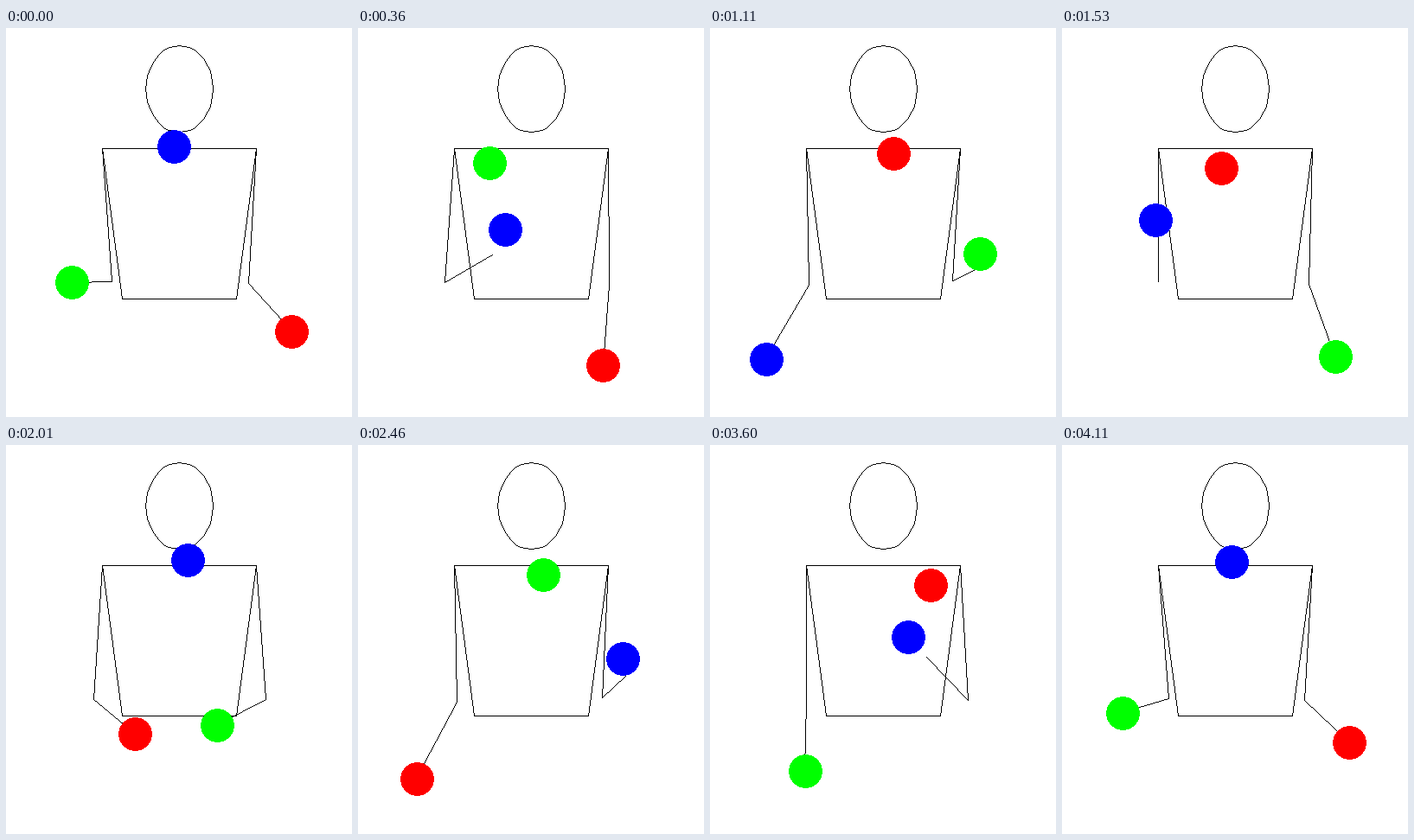
An HTML page with a canvas for the animation above (4140 ms loop, 400 by 450 pixels).

```html
<!DOCTYPE html>
<html lang="en">
<head>
<meta charset="utf-8">
<title>Three-ball juggler</title>
<style>
html, body { margin: 0; width: 100%; height: 100%; overflow: hidden; background: #fff; }
canvas { display: block; }
</style>
</head>
<body>
<canvas id="stage" width="400" height="450"></canvas>
<script>
const ctx = document.getElementById('stage').getContext('2d');

// Time is counted in ticks of 30 ms; each hand throws every 46 ticks.
const TICK = 30, LOOP = 138, CYCLE = 46, BEAT = 23;
const FLIGHT = 39.1, EMPTY = 16.1;
const LEVEL = 294, PEAK = 132;
const SCALE = 3.868, ARM = 41, REACH = 30;
const GRAVITY = (LEVEL - PEAK) / (FLIGHT / 2) ** 2;
const LIFT = -GRAVITY * FLIGHT;

// Throw and catch positions, plus hand velocity at the catch.
const left = { shoulder: 111.5, toss: 75.7, grab: 162.3, vx: -0.95, vy: 8.3, start: 0 };
const right = { shoulder: 289.5, toss: 239.3, grab: 325.9, vx: 3.4, vy: 8.95, start: BEAT };
left.speed = (right.grab - left.toss) / FLIGHT;
right.speed = (left.grab - right.toss) / FLIGHT;

const balls = [
  { color: '#f00', shift: 92 },
  { color: '#0f0', shift: 46 },
  { color: '#00f', shift: 0 }
];

const mod = (a, n) => ((a % n) + n) % n;

function hermite(s, span, a, va, b, vb) {
  const k = 1 - s;
  return a * (1 + 2 * s) * k * k + b * s * s * (3 - 2 * s)
    + span * (va * s * k * k - vb * s * s * k);
}

// Hand position, with phase counted from its last throw.
function handAt(h, phase) {
  if (phase < EMPTY) {
    const s = phase / EMPTY;
    return [hermite(s, EMPTY, h.toss, h.speed, h.grab, h.vx),
            hermite(s, EMPTY, LEVEL, LIFT, LEVEL, h.vy)];
  }
  const span = CYCLE - EMPTY, s = (phase - EMPTY) / span;
  return [hermite(s, span, h.grab, h.vx, h.toss, h.speed),
          hermite(s, span, LEVEL, h.vy, LEVEL, LIFT)];
}

function ballAt(tick) {
  const q = mod(tick - CYCLE, LOOP), r = q % 69;
  const from = q < 69 ? left : right, to = q < 69 ? right : left;
  if (r < FLIGHT) {
    return [from.toss + from.speed * r, PEAK + GRAVITY * (r - FLIGHT / 2) ** 2];
  }
  return handAt(to, r - BEAT);
}

// Elbow of two equal arm segments that reach forward and sag downwards.
function elbowAt(h, [hx, hy]) {
  const dx = (hx - h.shoulder) / SCALE, dz = (hy - 139) / SCALE;
  const flat = Math.hypot(dx, REACH), d = Math.hypot(flat, dz);
  const sag = Math.sqrt(Math.max(0, ARM * ARM - d * d / 4));
  const side = 0.5 - sag * dz / (flat * d);
  return [h.shoulder + dx * side * SCALE, 139 + (dz / 2 + sag * flat / d) * SCALE];
}

// Crisp one-pixel line.
function line(x0, y0, x1, y1) {
  [x0, y0, x1, y1] = [x0, y0, x1, y1].map(Math.floor);
  const n = Math.max(Math.abs(x1 - x0), Math.abs(y1 - y0), 1);
  for (let i = 0; i <= n; i++) {
    ctx.fillRect(Math.round(x0 + (x1 - x0) * i / n), Math.round(y0 + (y1 - y0) * i / n), 1, 1);
  }
}

function polygon(pts) {
  pts.forEach((p, i) => line(...p, ...pts[(i + 1) % pts.length]));
}

function disc(x, y, r) {
  const cx = Math.round(x), cy = Math.round(y);
  for (let dy = -19; dy <= 19; dy++) {
    const w = Math.floor(Math.sqrt(r * r - dy * dy));
    ctx.fillRect(cx - w, cy + dy, 2 * w + 1, 1);
  }
}

const head = Array.from({ length: 40 }, (_, i) => {
  const a = i * Math.PI / 20;
  return [200.6 + 38.8 * Math.cos(a), 70.5 + 50 * Math.sin(a)];
});
const torso = [[111, 139], [289, 139], [266, 313], [134, 313]];

function draw(tick) {
  ctx.fillStyle = '#fff';
  ctx.fillRect(0, 0, 400, 450);
  ctx.fillStyle = '#000';
  polygon(head);
  polygon(torso);
  for (const h of [left, right]) {
    const hand = handAt(h, mod(tick - h.start, CYCLE));
    const elbow = elbowAt(h, hand);
    line(h.shoulder, 139, ...elbow);
    line(...elbow, ...hand);
  }
  for (const b of balls) {
    ctx.fillStyle = b.color;
    disc(...ballAt(tick + b.shift), 19.4);
  }
}

function loop() {
  draw(Math.floor(performance.now() / TICK) % LOOP);
  requestAnimationFrame(loop);
}
loop();
</script>
</body>
</html>
```
